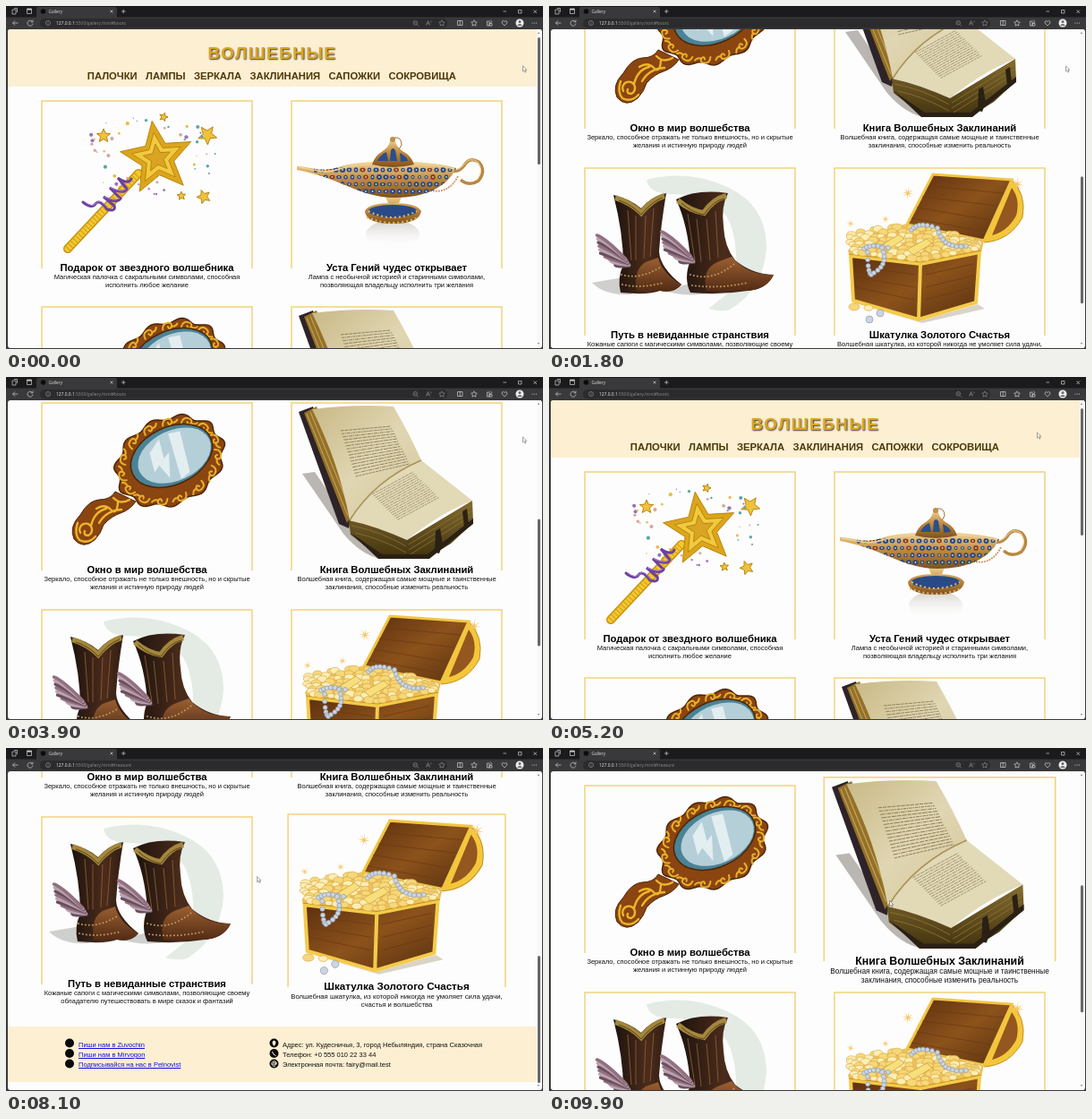
Animation, 600 px wide and 383 px high, one loop 10000 ms. Source, as an HTML page:

```html
<!DOCTYPE html>
<html lang="ru">
<head>
<meta charset="utf-8">
<title>Gallery</title>
<style>
@property --s { syntax: "<number>"; inherits: true; initial-value: 0; }
html, body { margin: 0; width: 100%; height: 100%; overflow: hidden; background: #39393b; }
body { position: relative; font: 7.5px/8.6px "Liberation Sans", Arial, sans-serif; color: #111; white-space: nowrap; }
.chrome, .cursor { position: absolute; left: 0; top: 0; }
.url { position: absolute; left: 56px; top: 15px; font: 4.9px/8px "Open Sans", sans-serif; color: #8d8d8d; }
.url b { font-weight: 400; color: #eee; }
.url i { position: absolute; font-style: normal; }
.boots-hash { animation: hash 10s step-end infinite; }
.gold-hash { animation: hash2 10s step-end infinite; }

.view { position: absolute; left: 2px; top: 26px; width: 597px; height: 356px; overflow: hidden; border-radius: 3px; background: #fdfdfd; animation: scroll 10s linear infinite; }
.page { position: absolute; left: -2px; top: -26px; width: 593px; height: 900px; transform: translateY(calc(var(--s) * -1px)); }
header, footer { position: absolute; left: 0; width: 593px; background: #fcefd2; }
header { top: 20px; height: 70px; }
h1 { position: absolute; left: 225.5px; top: 21.7px; margin: 0; font: bold 18.75px/21px "Liberation Sans", Arial, sans-serif; letter-spacing: 1.6px; color: #daa520; text-shadow: .9px .9px 1.6px #000b; }
nav { position: absolute; left: 90.8px; top: 52.2px; display: flex; gap: 9.4px; font: bold 11.25px/12.6px "Liberation Sans", Arial, sans-serif; color: #4c3708; }
footer { top: 801px; height: 61.5px; }
footer p { position: absolute; margin: 0; left: 81px; line-height: 11.2px; top: 14.8px; }
footer p + p { left: 309px; }
footer u { color: #1010e0; }
footer svg { position: absolute; left: 0; top: 0; }

.card { position: absolute; left: 39px; width: 237px; height: 188px; text-align: center; }
.right { left: 318px; }
.r1 { top: 105px; } .r2 { top: 335px; } .r3 { top: 566px; }
.card svg { position: absolute; left: 0; top: 0; }
.card h2, .card p { position: absolute; left: -20px; right: -20px; margin: 0; }
.card h2 { top: 181px; font: bold 11.25px/12.6px "Liberation Sans", Arial, sans-serif; color: #000; }
.card p { top: 194.3px; }
#mirrorCard { animation: mirror 10s infinite; }
#bookCard { animation: book 10s infinite; }
#bootsCard { animation: boots 10s infinite; }
#goldCard { animation: gold 10s infinite; }

.bar { position: absolute; right: 1px; top: 0; width: 5px; height: 356px; background: #f8f8f8; }
.bar::before, .bar::after { content: ""; position: absolute; left: 1px; top: 3px; border: 1.6px solid transparent; border-top: 0; border-bottom: 2.4px solid #777; }
.bar::after { top: 350px; transform: rotate(180deg); }
.thumb { position: absolute; left: 1px; top: 9px; width: 3px; height: 142px; border-radius: 2px; background: #666; transform: translateY(calc(var(--s) * .402px)); }
.cursor { animation: cursor 10s infinite; }

@keyframes scroll {
  0%, 5% { --s: 0; animation-timing-function: steps(3, start); }
  8% { --s: 125; animation-timing-function: steps(4, start); }
  12%, 14% { --s: 205; animation-timing-function: steps(3, start); }
  17% { --s: 350; animation-timing-function: steps(2, start); }
  19% { --s: 386; animation-timing-function: steps(1, start); }
  20%, 21% { --s: 392; animation-timing-function: steps(3, start); }
  24% { --s: 465; animation-timing-function: steps(3, start); }
  27%, 36% { --s: 490; animation-timing-function: steps(4, start); }
  40% { --s: 307; animation-timing-function: steps(4, start); }
  44% { --s: 130; animation-timing-function: steps(3, start); }
  47% { --s: 45; animation-timing-function: steps(4, start); }
  51%, 57% { --s: 0; animation-timing-function: steps(2, start); }
  59% { --s: 90; animation-timing-function: steps(3, start); }
  62% { --s: 400; animation-timing-function: steps(2, start); }
  64%, 87% { --s: 490; animation-timing-function: steps(3, start); }
  90% { --s: 330; animation-timing-function: steps(3, start); }
  93%, 100% { --s: 294; }
}
@keyframes cursor {
  0%, 52% { transform: translate(577px, 66.5px); animation-timing-function: steps(1, start); }
  53%, 55% { transform: translate(545px, 61.5px); animation-timing-function: steps(2, start); }
  57%, 67% { transform: translate(474px, 78px); animation-timing-function: steps(1, start); }
  68%, 80% { transform: translate(474.5px, 109px); animation-timing-function: steps(3, start); }
  83%, 95% { transform: translate(183px, 160px); animation-timing-function: steps(2, start); }
  97%, 100% { transform: translate(380px, 170px); }
}
@keyframes gold {
  0%, 67% { transform: none; animation-timing-function: steps(2, start); }
  69%, 80% { transform: scale(1.1); animation-timing-function: steps(3, start); }
  83%, 100% { transform: none; }
}
@keyframes boots {
  0%, 82% { transform: none; animation-timing-function: steps(3, start); }
  85%, 90% { transform: scale(1.1); animation-timing-function: steps(3, start); }
  93%, 100% { transform: none; }
}
@keyframes mirror {
  0%, 90% { transform: none; animation-timing-function: steps(3, start); }
  93%, 96% { transform: scale(1.1); animation-timing-function: steps(3, start); }
  99%, 100% { transform: none; }
}
@keyframes book {
  0%, 97% { transform: none; animation-timing-function: steps(3, start); }
  100% { transform: scale(1.1); }
}
@keyframes hash { 0% { visibility: visible; } 57%, 100% { visibility: hidden; } }
@keyframes hash2 { 0% { visibility: hidden; } 57%, 100% { visibility: visible; } }
</style>
</head>
<body>
<svg class="chrome" width="600" height="383" fill="none" stroke="#d0d0d0" stroke-width=".7">
  <g stroke="none">
    <path fill="#1b1b1d" d="M0 0h600v13H0z"/>
    <path fill="#39393b" d="M0 12.500h600v14H0zM34 13V3q0-2 2-2h86q2 0 2 2v10z"/>
    <rect x="38" y="14" width="455" height="10.500" rx="5" fill="#2b2b2d"/>
    <circle cx="41.500" cy="6" r="2.800" fill="#0c0c0d"/>
    <circle cx="574" cy="19" r="4.500" fill="#eee"/>
    <path fill="#666" d="M571 22q3-4 6 0zM572.500 17.500a1.500 1.500 0 1 1 3 0a1.500 1.500 0 1 1-3 0"/>
  </g>
  <path d="M7 4h4v5H7zM9 2.500h3.500V7M23.500 3h5v5.500h-5z"/><path stroke-width="1.500" d="M23.500 3.800h5"/>
  <path d="M116.500 4.500l3 3m0-3l-3 3M129 6h4.500m-2.250-2.250v4.500M555.500 6h3.500M572.500 4.500h3.500v3.500h-3.500zM589.500 4.500l3.500 3.500m0-3.500l-3.500 3.500"/>
  <path d="M13.500 19h-6l2.500-2.500M7.500 19l2.500 2.500M29.500 17.500a3 3 0 1 0 .5 2M30 15.500v2.300h-2.300"/>
  <g stroke="#999" stroke-width=".6">
    <circle cx="47" cy="19" r="2.600"/><path d="M47 18.500v2M47 17.200v.6M459 20.500l2 2M456 18.800h2.500"/><circle cx="457.300" cy="18.800" r="2.300"/>
    <path d="M469.500 21.500l2-5 2 5m-3.300-1.700h2.600M474.500 16.500q1 1 0 2"/>
    <path d="M487 15.800l1 2.100 2.300.3-1.700 1.600.4 2.300-2-1.100-2 1.100.4-2.300-1.700-1.600 2.300-.3z"/>
  </g>
  <path d="M523 15.800l1 2.100 2.300.3-1.700 1.600.4 2.300-2-1.100-2 1.100.4-2.300-1.700-1.600 2.300-.3zM504.500 16.500h5.500v5h-5.500zM507.250 16.500v5M537.500 17h2.500v5h-2.500zM540 19.500h3V22h-3zM541 15.500l2 2-2 1.500M557 22l-2.800-3q-.5-2.500 1.500-2.500l1.300 1 1.300-1q2 0 1.500 2.500z"/>
  <path stroke="#ddd" stroke-linecap="round" stroke-dasharray="0 2.200" stroke-width="1.100" d="M588 19h5"/>
  <text x="47.500" y="7.700" fill="#ddd" stroke="none" font-size="4.800" font-family="Open Sans, sans-serif">Gallery</text>
</svg>
<div class="url"><b>127.0.0.1</b>:5500/gallery.html<i class="boots-hash">#boots</i><i class="gold-hash">#treasure</i></div>

<div class="view">
<div class="page">
  <header>
    <h1>ВОЛШЕБНЫЕ</h1>
    <nav><span>ПАЛОЧКИ</span><span>ЛАМПЫ</span><span>ЗЕРКАЛА</span><span>ЗАКЛИНАНИЯ</span><span>САПОЖКИ</span><span>СОКРОВИЩА</span></nav>
  </header>

  <div class="card r1">
    <svg width="237" height="188" viewBox="39 105 237 188">
      <g id="dust"></g>
      <path stroke="#c8920f" stroke-width="10" stroke-linecap="round" d="M69 271L148 187"/>
      <path stroke="#f2c92e" stroke-width="7" stroke-linecap="round" d="M69 271L148 187"/>
      <path stroke="#d49a18" stroke-width="8" stroke-dasharray="1 3" d="M69 271L148 187"/>
      <path fill="none" stroke="#6d3fa0" stroke-width="3" stroke-linecap="round" d="M86 219q10 8 14 2t13 6q10 3 8-4l-12-10q15 8 19 2l-12-12q16 8 19 1l-10-12q12 8 15 1"/>
      <path fill="none" stroke="#a884d0" d="M87 218q10 8 14 2t13 6M110 213q13 6 17 1M117 203q14 6 17 1"/>
      <g id="star"></g>
    </svg>
    <h2>Подарок от звездного волшебника</h2>
    <p>Магическая палочка с сакральными символами, способная<br>исполнить любое желание</p>
  </div>

  <div class="card right r1">
    <svg width="237" height="188" viewBox="318 105 237 188">
      <defs>
        <linearGradient id="brass" x2="0" y2="1"><stop stop-color="#f3d79a"/><stop offset=".5" stop-color="#c08a3e"/><stop offset="1" stop-color="#80501c"/></linearGradient>
        <linearGradient id="fade" x2="0" y2="1"><stop stop-color="#b9b4a8" stop-opacity=".6"/><stop offset="1" stop-color="#fff" stop-opacity="0"/></linearGradient>
        <clipPath id="lampClip"><path id="lampShape" d="M325 179C343 180 353 186 371 180C398 171 468 171 503 181C492 203 468 214 434 214C395 214 372 191 325 183Z"/></clipPath>
      </defs>
      <ellipse cx="432" cy="255" rx="30" ry="16" fill="url(#fade)"/>
      <path fill="none" stroke="#b98842" stroke-width="3.500" d="M496 184Q506 186 512 178Q518 168 528 174Q537 184 528 195Q518 202 508 194"/>
      <path fill="none" stroke="#f2d9a0" d="M498 183Q506 184 512 177Q518 168 527 174Q534 183 527 193"/>
      <path fill="none" stroke="#cf9668" stroke-width="1.800" stroke-dasharray="2 1" d="M505 190Q494 212 470 205"/>
      <path fill="url(#brass)" d="M423 211h20l-4 9h-12zM401 229q4-9 31-9t32 9q-2 14-32 14t-31-14z"/>
      <ellipse cx="432" cy="229" rx="27" ry="7" fill="#294a86"/><path fill="none" stroke="#e3bb6c" stroke-width="2" stroke-dasharray="2 3" d="M405 229q27 14 54 0M403 236q29 12 58 0"/>
      <use href="#lampShape" fill="url(#brass)"/>
      <g id="enamel" clip-path="url(#lampClip)"></g>
      <path fill="none" stroke="#f0d292" stroke-width="1.500" d="M327 180C345 183 356 188 373 182C400 173 468 174 501 182"/>
      <path fill="url(#brass)" d="M409 177q3-10 12-15q7-5 8-11q3-7 6 0q1 6 8 11q10 5 13 15q-24 6-47 0z"/>
      <path fill="#2b4f8c" d="M415 173q3-7 10-10l2 10zM430 161q2-4 5 0l2 12h-8zM440 164q8 4 9 9l-8 1z"/>
      <circle cx="432" cy="149" r="3" fill="#bc914e"/><path fill="none" stroke="#9d7034" d="M434 147q8-1 8 8l-3 5"/>
    </svg>
    <h2>Уста Гений чудес открывает</h2>
    <p>Лампа с необычной историей и старинными символами,<br>позволяющая владельцу исполнить три желания</p>
  </div>

  <div class="card r2" id="mirrorCard">
    <svg width="237" height="188" viewBox="39 41 237 188">
      <path fill="#8a4510" stroke="#4f2607" d="M122 141Q117 150 104 150Q92 151 83 167Q70 180 76 194Q86 206 99 195Q106 188 109 178Q118 168 128 165Q139 161 145 152Z"/>
      <g id="frame"></g>
      <g transform="rotate(-25 185 101)">
        <ellipse cx="185" cy="101" rx="48" ry="32" fill="#4a8396" stroke="#4f2607" stroke-width="1.500"/>
        <ellipse cx="188" cy="102" rx="43" ry="28" fill="#b5cfd8"/>
        <path fill="#e3eef1" d="M164 88l16-10-4 22 8-4-11 27-5-18-8 5zM192 77l13 3-9 46-12 3z"/>
      </g>
      <g fill="none" stroke="#edb52b" stroke-width="2.400" stroke-linecap="round">
        <path d="M83 187a7 7 0 1 1 9 3q-6 0-4-5M95 179q4-16 17-19M101 160q9-6 16 1t8-8M104 176q8-14 25-15M120 148q8 8 18 2M80 176q-4 12 2 19q10 5 18-4"/>
      </g>
    </svg>
    <h2>Окно в мир волшебства</h2>
    <p>Зеркало, способное отражать не только внешность, но и скрытые<br>желания и истинную природу людей</p>
  </div>

  <div class="card right r2" id="bookCard">
    <svg width="237" height="188" viewBox="318 28 237 188">
      <defs>
        <linearGradient id="leaf" x2="1" y2="1"><stop stop-color="#c9b987"/><stop offset=".5" stop-color="#e0d6b2"/><stop offset="1" stop-color="#d3c69a"/></linearGradient>
        <linearGradient id="block" x2="0" y2="1"><stop stop-color="#846c30"/><stop offset="1" stop-color="#43330f"/></linearGradient>
      </defs>
      <path fill="#bab6b2" d="M331 108l14-2 42 62 32 35q-22-4-42-28z"/>
      <path fill="#2d2328" d="M327 39l16-6 43 122-3 14-11-5z"/>
      <path fill="#94712a" d="M333 40l14-7 45 112-11 18z"/>
      <path stroke="#cba95a" d="M336 41l46 114M340 39l45 110M344 37l45 106"/>
      <path fill="url(#leaf)" d="M342 36Q390 30 433 33Q450 62 464 93Q412 115 384 160Q372 95 342 36Z"/>
      <path fill="#e2d9b6" d="M464 93L521 138Q485 152 448 182Q412 166 384 160Q412 115 464 93Z"/>
      <path fill="none" stroke="#a8925a" stroke-width="1.500" d="M464 93Q412 115 384 160"/>
      <path fill="url(#block)" d="M383 160Q412 166 448 182L521 138L522 163L497 186L471 202H418L385 176Z"/>
      <path fill="none" stroke="#8d7435" stroke-width=".8" d="M386 166q32 6 61 23M390 174q28 6 57 22M450 187l70-43M450 193l70-43M452 198l68-43"/>
      <path fill="#2a2014" d="M385 174l35 24h51l51-40v6l-49 39h-57zM480 172l5-3 3 18-4 10-5-1zM510 150l5-3 2 18-5 3z"/>
      <g id="lines" stroke="#8a7c58" stroke-width=".9"></g>
    </svg>
    <h2>Книга Волшебных Заклинаний</h2>
    <p>Волшебная книга, содержащая самые мощные и таинственные<br>заклинания, способные изменить реальность</p>
  </div>

  <div class="card r3" id="bootsCard">
    <svg width="237" height="188" viewBox="39 76 237 188">
      <defs><linearGradient id="hide"><stop stop-color="#1c120e"/><stop offset=".5" stop-color="#4b2c1b"/><stop offset="1" stop-color="#1c120e"/></linearGradient>
      <linearGradient id="foot" x2="0" y2="1"><stop stop-color="#9c6032"/><stop offset="1" stop-color="#522b15"/></linearGradient></defs>
      <path fill="#e4ebe5" d="M109 90Q155 78 199 98Q243 118 243 166Q240 212 202 235Q192 238 178 234L206 212Q214 170 202 138Q190 108 140 106Q112 107 109 90Z"/>
      <path fill="#cfcfcd" d="M48 205l35-6 10 19q-30 2-45-13zM130 214l30-9 18 12q-30 4-48-3z"/>
      <path fill="url(#hide)" d="M72 107Q92 112 103 122Q115 108 131 105Q125 140 123 170Q124 188 148 207Q140 217 124 214Q112 219 80 216Q76 200 83 185Q83 150 72 107Z"/>
      <path fill="url(#hide)" d="M142 112Q165 100 200 105Q192 120 195 142Q196 165 208 180Q228 196 251 196Q244 212 222 214Q190 219 158 216Q150 200 158 180Q155 140 142 112Z"/>
      <path fill="url(#foot)" d="M98 214Q94 190 108 182L122 177Q126 194 148 207Q140 217 124 214ZM176 214Q170 190 188 182L204 176Q222 197 251 196Q244 212 222 214Z"/>
      <path fill="none" stroke="#a3873c" stroke-width="6" d="M74 110Q92 116 103 127Q115 112 129 108M144 113Q158 125 173 127Q183 112 198 108"/>
      <path fill="none" stroke="#594419" d="M78 113Q93 118 103 129Q115 114 127 110M148 116Q160 127 173 129Q184 113 196 111"/>
      <path fill="none" stroke="#8a5c33" stroke-width=".9" d="M88 124l4 56M97 130v50M108 130l-2 48M117 122l-4 54M155 128l8 52M165 134l5 48M176 134l4 46M186 125l3 52"/>
      <path fill="none" stroke="#bf9a56" stroke-width="2" stroke-linecap="round" stroke-dasharray="0 4" d="M81 196q20 6 43-8M82 207q20 5 46-2M158 196q25 8 49-12M160 208q30 4 62-3"/>
      <g id="wing"></g><use href="#wing" x="72" y="-4"/>
    </svg>
    <h2>Путь в невиданные странствия</h2>
    <p>Кожаные сапоги с магическими символами, позволяющие своему<br>обладателю путешествовать в мире сказок и фантазий</p>
  </div>

  <div class="card right r3" id="goldCard">
    <svg width="237" height="188" viewBox="318 180 237 188">
      <defs><linearGradient id="wood" x2="1" y2="1"><stop stop-color="#5a2e0e"/><stop offset=".5" stop-color="#8c521b"/><stop offset="1" stop-color="#58300f"/></linearGradient></defs>
      <path fill="#d9d3c8" d="M345 333l68 19 66-19 8 5-70 16z"/>
      <path fill="#f4c73a" stroke="#c48d1a" d="M516 193Q534 210 529 236Q515 262 486 264Z"/>
      <path fill="#94571f" d="M517 203Q527 216 522 234Q512 252 495 256Z"/>
      <path fill="url(#wood)" stroke="#f2c542" stroke-width="3" d="M400 244L429 188L517 194L486 262Z"/>
      <path fill="none" stroke="#6d3b14" stroke-width=".8" d="M424 201l84 8M417 213l84 10M411 225l82 14M405 237l82 15"/>
      <path fill="#edc35a" d="M334 273L352 256L400 243L486 262L483 275L415 290L336 281Z"/>
      <path fill="url(#wood)" stroke="#f4cb4a" stroke-width="4" stroke-linejoin="round" d="M337 279L415 288L413 350L340 329ZM415 288L481 275L477 331L413 350Z"/>
      <path fill="none" stroke="#6d3b14" stroke-width=".8" d="M343 291l66 9M343 303l66 11M343 314l65 14M421 300l53-12M421 314l53-13M421 328l51-14"/>
      <path fill="none" stroke="#c48d1a" d="M335 277L415 286L483 273"/>
      <g id="coins"></g>
      <path fill="#f8df7c" stroke="#c89b35" stroke-width=".7" d="M373 266l18-11 6 5-18 12zM400 272l22-12 6 5-21 13z"/>
      <g id="pearls"></g>
    </svg>
    <h2>Шкатулка Золотого Счастья</h2>
    <p>Волшебная шкатулка, из которой никогда не умоляет сила удачи,<br>счастья и волшебства</p>
  </div>

  <footer>
    <svg width="593" height="61">
      <g fill="#0b0b0b"><circle cx="71" cy="18.500" r="5"/><circle cx="71" cy="30" r="5"/><circle cx="71" cy="41.500" r="5"/><circle cx="299.500" cy="18.500" r="5"/><circle cx="299.500" cy="30" r="5"/><circle cx="299.500" cy="41.500" r="5"/></g>
      <path fill="#fcefd2" d="M299.500 22q-4-5 0-6.500q4 1.500 0 6.500z"/>
      <g fill="none" stroke="#fcefd2"><path d="M297.500 28q1 4 4 4.500"/><circle cx="299.500" cy="41.500" r="1.200"/><path d="M301 40v2.500q2 0 1-2.500a2.800 2.800 0 1 0-1 4"/></g>
    </svg>
    <p><u>Пиши нам в Zuvochin</u><br><u>Пиши нам в Mirvogon</u><br><u>Подписывайся на нас в Pelnovist</u></p>
    <p>Адрес: ул. Кудесничья, 3, город Небыляндия, страна Сказочная<br>Телефон: +0 555 010 22 33 44<br>Электронная почта: fairy@mail.test</p>
  </footer>
</div>
<div class="bar"><div class="thumb"></div></div>
</div>

<svg class="cursor" width="8" height="10"><path d="M.5.500v6l1.400-1.200 1 2.200 1.100-.5-1-2.100h1.900z" fill="#fff" stroke="#444" stroke-width=".5"/></svg>

<script>
let seed = 7;
const rnd = (a = 0, b = 1) => a + (b - a) * ((seed = seed * 16807 % 2147483647) / 2147483647);

function add(parent, tag, attrs) {
  const el = document.createElementNS("http://www.w3.org/2000/svg", tag);
  for (const k in attrs) el.setAttribute(k, attrs[k]);
  (parent.append ? parent : document.getElementById(parent)).append(el);
}

function star(id, x, y, r, attrs, rot = 0, n = 5, inner = .45) {
  const pts = Array.from({ length: n * 2 }, (_, i) => {
    const a = Math.PI * (i / n - .5 + rot / 180), d = i % 2 ? r * inner : r;
    return (x + d * Math.cos(a)).toFixed(1) + "," + (y + d * Math.sin(a)).toFixed(1);
  });
  add(id, "polygon", { points: pts.join(" "), ...attrs });
}

// card borders, open at the bottom
for (const svg of document.querySelectorAll(".card svg")) {
  const { x, y } = svg.viewBox.baseVal;
  add(svg, "path", { d: `M${x + 1} ${y + 188}V${y + 1}h235v187`, fill: "none", stroke: "#f2d27c", "stroke-width": 1.5 });
}

// wand
const gold = { fill: "#eec23a", stroke: "#b8860f", "stroke-width": 1 };
[42, 29, 16].forEach((r, i) => star("star", 169, 170, r, { ...gold, fill: ["#dca51c", "#f1c93f", "#d9a423"][i] }, -8));
[[109, 145, 8], [176, 124, 5], [225, 144, 11], [221, 213, 8], [196, 212, 5]].forEach(([x, y, r], i) => star("dust", x, y, r, gold, i * 17));
for (let i = 0; i < 46; i++) {
  const a = rnd(0, 6.28), d = rnd(.6, 1);
  add("dust", "circle", { cx: 160 + 76 * d * Math.cos(a), cy: 165 + 47 * d * Math.sin(a), r: rnd(.6, 2.2), fill: ["#5ba5a8", "#9a72b5", "#e6bd48", "#d9a3a0"][i % 4] });
}

// lamp enamel
for (let row = 0; row < 4; row++)
  for (let i = 0; i < 22; i++) {
    const x = 346 + i * 7.5 + row % 2 * 3.5, y = 183 + row * 8;
    add("enamel", "ellipse", { cx: x, cy: y, rx: rnd(2, 3.2), ry: rnd(2, 3), fill: i % 5 == 2 && row < 2 ? "#8a3d26" : "#274a88" });
    add("enamel", "circle", { cx: x, cy: y, r: .9, fill: "#ecd193" });
  }

// mirror frame
const rim = (a, k) => {
  const x = 62 * k * Math.cos(a), y = 47 * k * Math.sin(a), c = .906, s = .423;
  return [183 + x * c + y * s, 107 - x * s + y * c];
};
const edge = Array.from({ length: 120 }, (_, i) => rim(i * Math.PI / 60, 1 + .05 * Math.sin(i * Math.PI / 60 * 11)).map(v => v.toFixed(1)));
add("frame", "polygon", { points: edge.join(" "), fill: "#8a4510", stroke: "#4f2607", "stroke-width": 1.5 });
for (let i = 0; i < 15; i++) {
  const [x, y] = rim(i * .419, .91);
  add("frame", "path", { d: "M-7 4q0-7 6-7t4 5q-3 3-4-1M3 1q4 2 7-2", fill: "none", stroke: "#e9b02a", "stroke-width": 2, "stroke-linecap": "round", transform: `translate(${x} ${y}) rotate(${i * 24 + 65})` });
}

// book text
for (let i = 0; i < 16; i++) {
  const dash = `${rnd(3, 6)} .8 ${rnd(1, 4)} .9`;
  add("lines", "path", { d: `M${374 + i * 1.1} ${60 + i * 3.4}l${56 + i * .3} ${-5 - i * .6}`, "stroke-dasharray": dash });
  add("lines", "path", { d: `M${409 + i * 1.9} ${131 + i * 1.9}l46 -25`, "stroke-dasharray": dash, "stroke-width": .7 });
}

// boot wing
for (let i = 0; i < 9; i++)
  add("wing", "path", { d: `M${90 - i * .6} ${186 - i}Q${72 - i} ${188 - i * 4} ${60 - i * .8 + (i < 3 ? 14 - i * 5 : 0)} ${184 - i * 4}`, fill: "none", stroke: ["#6b4f5c", "#b7a3b2", "#94707f"][i % 3], "stroke-width": 3.6, "stroke-linecap": "round" });

// treasure
const coin = (x, y, rx = 5) => add("coins", "ellipse", { cx: x, cy: y, rx, ry: rx * .65, fill: rnd() < .5 ? "#fdeeb4" : "#f6d87a", stroke: "#d3a23c", "stroke-width": .6 });
for (let k = 0; k < 8; k++)
  for (let i = 0; i < 14; i++) {
    const x = 340 + i * 10.4 + rnd(-4, 4);
    const top = 247 + 18 * ((x - 395) / 85) ** 2;
    const low = x < 415 ? 274 + (x - 336) * .11 : 283 - (x - 415) * .2;
    coin(x, top + (low - top) * k / 7, rnd(4, 6.2));
  }
coin(341, 336, 6); coin(357, 337, 5);

const pearl = (x, y, r = 2.5) => add("pearls", "circle", { cx: x, cy: y, r, fill: "#cbd5e2", stroke: "#8492a8", "stroke-width": .6 });
function beads(x0, y0, x1, y1, x2, y2, n) {
  for (let i = 0; i <= n; i++) {
    const t = i / n, q = 1 - t;
    pearl(q * q * x0 + 2 * q * t * x1 + t * t * x2, q * q * y0 + 2 * q * t * y1 + t * t * y2);
  }
}
beads(352, 271, 360, 265, 379, 270, 6);
beads(356, 275, 356, 298, 360, 300, 5);
beads(363, 298, 380, 288, 372, 270, 7);
beads(405, 250, 412, 240, 434, 248, 7);
beads(434, 248, 440, 272, 466, 268, 9);
pearl(358, 350, 4); pearl(370, 343, 4);
[[401, 209, 7], [337, 243, 5], [376, 238, 5], [523, 199, 8]].forEach(([x, y, r]) => star("pearls", x, y, r, { fill: "#f4c66a" }, 10, 8, .2));
</script>
</body>
</html>
```
